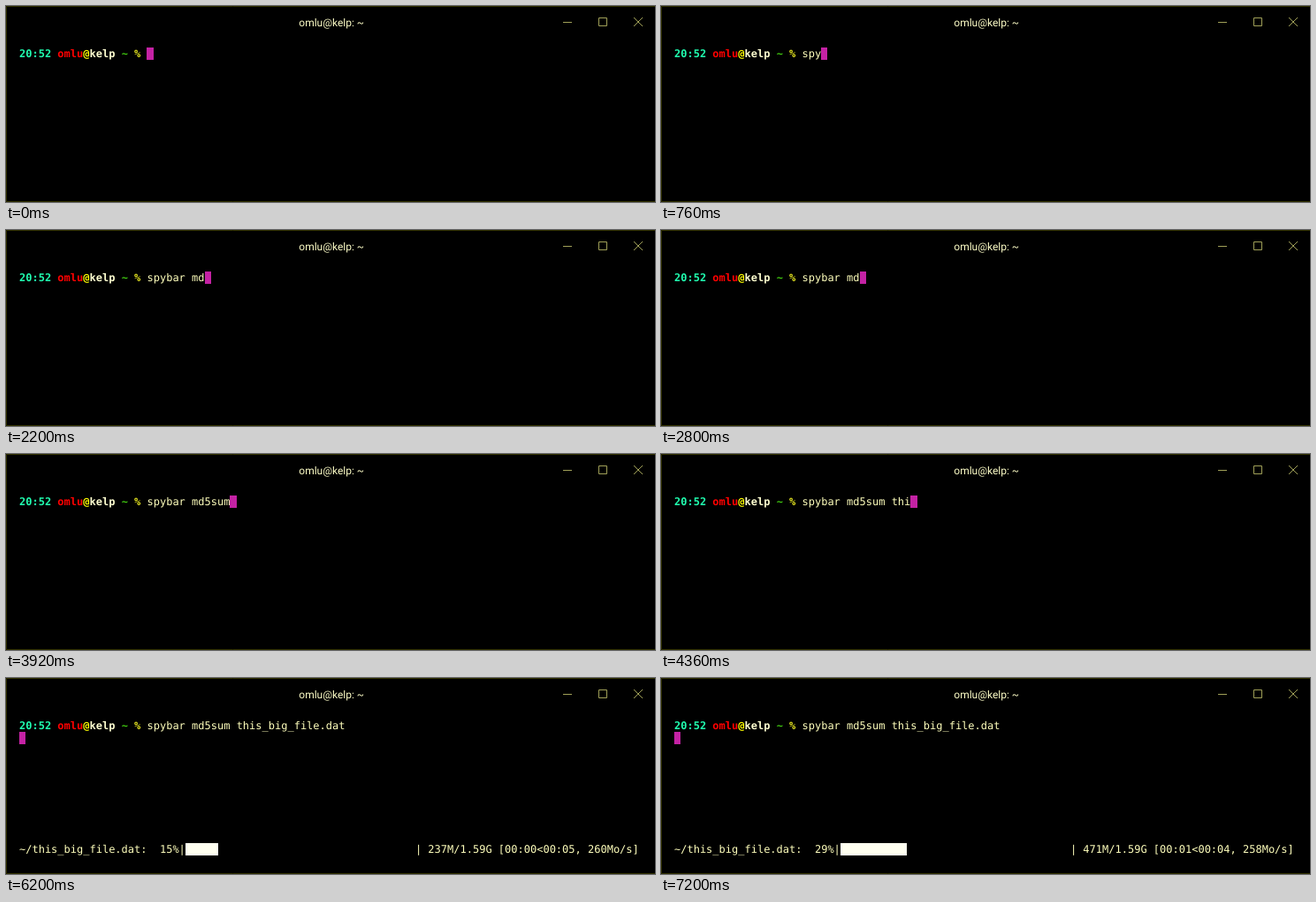
An HTML page for the animation above (8000 ms loop, 734 by 222 pixels).

```html
<!DOCTYPE html>
<html lang="en">
<meta charset="utf-8">
<title>Terminal</title>
<style>
  html, body { margin: 0; width: 100%; height: 100%; overflow: hidden; background: #000; }
  svg { display: block; }
  text { font: 12px "DejaVu Sans Mono", monospace; white-space: pre; fill: #ffffbc; text-rendering: geometricPrecision; }
  .title { font-family: Roboto, sans-serif; fill: #ffffc8; text-anchor: middle; }
  .prompt { font-weight: bold; }
  .frame { fill: none; stroke: #303000; }
  .buttons { fill: none; stroke: #a0a058; }
</style>
<svg width="734" height="222">
  <path class="frame" d="M734 .5H.5v221H734"/>
  <text class="title" x="368.2" y="22.6">omlu@kelp: ~</text>
  <path class="buttons" d="M630 18.5h10M670.5 13.5h9v9h-9zM710 13l10 10M720 13l-10 10"/>
  <text class="prompt" x="15" y="58"><tspan fill="#20ffb0">20:52 </tspan><tspan fill="#ff0000">omlu</tspan><tspan fill="#ffff00">@</tspan><tspan fill="#ffffd0">kelp</tspan><tspan fill="#40c810"> ~</tspan><tspan fill="#e8e820"> %</tspan></text>
  <text id="typed" y="58"></text>
  <rect id="cursor" height="14" fill="#c422a4"/>
  <g id="progress">
    <text id="label" x="15" y="198"></text>
    <rect id="bar" y="187" height="14" fill="#fffff0"/>
    <text id="stats" y="198"></text>
  </g>
</svg>
<script>
  const LOOP = 8000, CELL = 7.2246, LEFT = 15, COLS = 97, PROMPT = 20;
  const command = 'spybar md5sum this_big_file.dat';
  // Time of each key press; the final one completes the file name.
  const keys = [60, 380, 700, 880, 1160, 1320, 1640, 1800, 2120, 2840,
    3240, 3360, 3600, 4000, 4120, 4240, 4360, 4480];
  const ENTER = 4800;
  const updates = [
    { at: 5160, percent: 0, cells: 0, stats: '0.00/1.59G [00:00<?, ?o/s]' },
    { at: 6120, percent: 15, cells: 5.125, stats: '237M/1.59G [00:00<00:05, 260Mo/s]' },
    { at: 7080, percent: 29, cells: 10.375, stats: '471M/1.59G [00:01<00:04, 258Mo/s]' }
  ];

  const el = id => document.getElementById(id);
  const set = (id, attrs) => {
    for (const name in attrs) el(id).setAttribute(name, attrs[name]);
  };
  const colX = col => LEFT + col * CELL;

  // Place a block over whole pixels, from one column for a number of cells.
  function setBlock(id, col, cells) {
    const x = Math.round(colX(col));
    set(id, { x, width: Math.round(colX(col + cells)) - x });
  }

  function draw(t) {
    const pressed = keys.filter(k => k <= t).length;
    const count = pressed === keys.length ? command.length : pressed;
    el('typed').textContent = command.slice(0, count);

    const entered = t >= ENTER;
    setBlock('cursor', entered ? 0 : PROMPT + count, 1);
    set('cursor', { y: entered ? 61 : 47 });

    const state = updates.filter(u => u.at <= t).pop();
    set('progress', { visibility: state ? 'visible' : 'hidden' });
    if (!state) return;
    const label = `~/this_big_file.dat: ${String(state.percent).padStart(3)}%|`;
    const stats = '| ' + state.stats;
    el('label').textContent = label;
    el('stats').textContent = stats;
    set('stats', { x: colX(COLS - stats.length) });
    setBlock('bar', label.length, state.cells);
  }

  set('typed', { x: colX(PROMPT) });
  const start = performance.now();
  function tick() {
    draw((performance.now() - start) % LOOP);
    requestAnimationFrame(tick);
  }
  tick();
</script>
</html>
```
